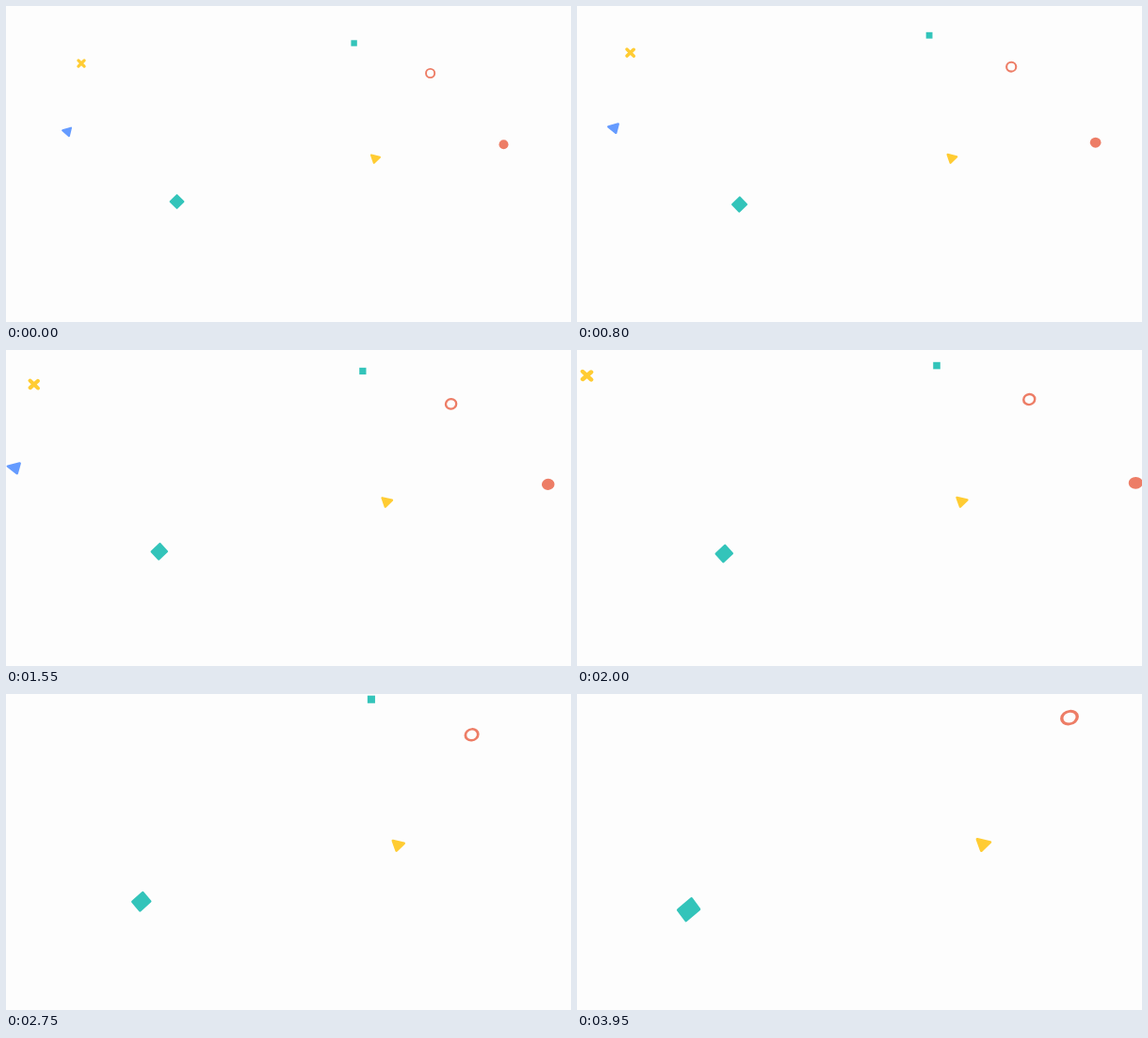
Write an HTML page that moves like this. It is 600 px wide and 336 px high and loops after 4000 ms.

```html
<!DOCTYPE html>
<html lang="en">
<head>
<meta charset="utf-8">
<title>Drifting shapes</title>
<style>
  html, body { margin: 0; width: 100%; height: 100%; overflow: hidden; background: #fdfdfd; }
  svg { display: block; width: 600px; height: 336px; }
  .solid { stroke-width: 2; stroke-linejoin: round; }
  .yellow { fill: #ffcc33; stroke: #ffcc33; }
  .teal { fill: #33c4ba; stroke: #33c4ba; }
  .blue { fill: #659bff; stroke: #659bff; }
  .coral { fill: #ed7d66; }
  .ring { fill: none; stroke: #ed7d66; stroke-width: 1.9; }
  .cross { stroke-width: 3.2; stroke-linecap: round; }
</style>
</head>
<body>
<svg viewBox="0 0 600 336">
  <path id="cross" class="yellow cross" d="M-3.1-3.1 3.1 3.1M3.1-3.1-3.1 3.1"/>
  <path id="blueTri" class="blue solid" d="M-4.4-1.2 4.5-3.9 2.4 4.7Z"/>
  <path id="diamond" class="teal solid" d="M0-6.9 6.9 0 0 6.9-6.9 0Z"/>
  <rect id="square" class="teal" stroke="none" style="stroke:none" x="-3.2" y="-3.2" width="6.4" height="6.4"/>
  <circle id="ring" class="ring" r="4.6"/>
  <path id="yellowTri" class="yellow solid" d="M-4.1-3.5 5-1.3-1.2 4.9Z"/>
  <circle id="disc" class="coral" r="5"/>
</svg>
<script>
  const LOOP = 4000, STEP = 50;
  const CX = 300, CY = 168;

  // x, y: start position; speed: approach rate per second;
  // gx, gy: how the speed varies across the shape, which stretches it.
  const shapes = [
    { id: 'cross', x: 80, y: 61, speed: .12, gx: -.0002, gy: 0 },
    { id: 'blueTri', x: 64.5, y: 133.5, speed: .1245, gx: -.0003, gy: 0 },
    { id: 'diamond', x: 181.5, y: 208, speed: .0878, gx: -.00006, gy: .00034 },
    { id: 'square', x: 369.6, y: 39.5, speed: .0757, gx: 0, gy: 0 },
    { id: 'ring', x: 450.6, y: 71.5, speed: .0822, gx: .00024, gy: 0 },
    { id: 'yellowTri', x: 392, y: 162, speed: .0757, gx: .0001, gy: 0 },
    { id: 'disc', x: 528.5, y: 147.2, speed: .1105, gx: .0003, gy: 0 }
  ];
  for (const s of shapes) s.el = document.getElementById(s.id);

  function place({ el, x, y, speed, gx, gy }, t) {
    const dx = x - CX, dy = y - CY;
    const zoom = 1 / (1 - speed * t);
    const warp = zoom * zoom * t;
    const m = [
      zoom + dx * warp * gx, dy * warp * gx,
      dx * warp * gy, zoom + dy * warp * gy,
      CX + dx * zoom, CY + dy * zoom
    ];
    el.setAttribute('transform', `matrix(${m.map(v => v.toFixed(4)).join(' ')})`);
  }

  function draw() {
    const ms = performance.now() % LOOP;
    const t = Math.floor(ms / STEP) * STEP / 1000;
    for (const s of shapes) place(s, t);
    requestAnimationFrame(draw);
  }
  draw();
</script>
</body>
</html>
```
